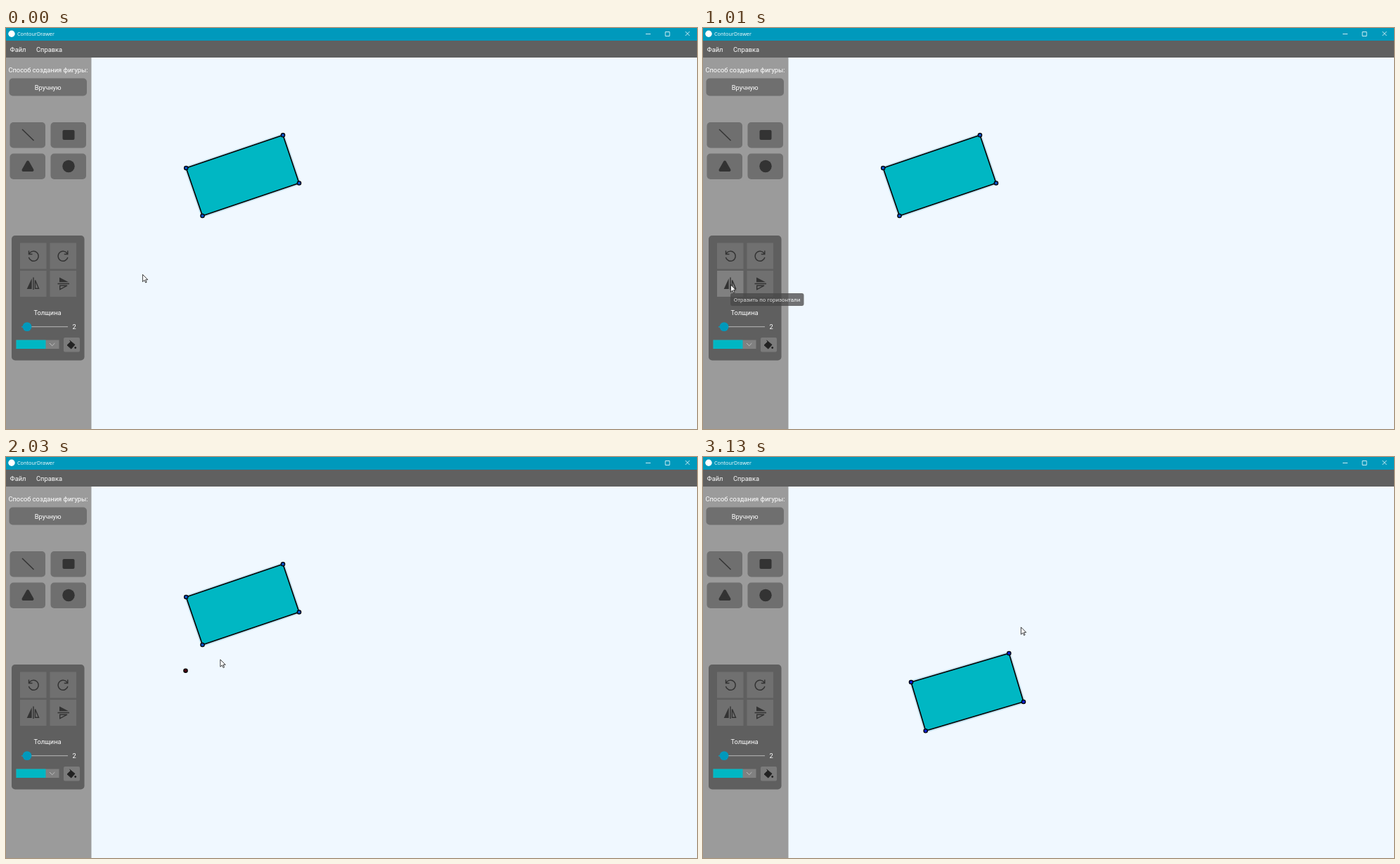
Animation, 983 px wide and 570 px high, one loop 3.26 s. Source, as an HTML page:

```html
<!DOCTYPE html>
<html lang="ru">
<head>
<meta charset="utf-8">
<title>ContourDrawer</title>
<style>
  html, body { margin: 0; width: 100%; height: 100%; overflow: hidden; }
  svg { display: block; }
  text { font: 9.3px Roboto, sans-serif; fill: #fff; }
  .title { font: 7.3px "Open Sans", sans-serif; }
  .mid { text-anchor: middle; }
  .btn { fill: #6f6f6f; }
  .tool rect { fill: #707070; }
  .tool.hover rect { fill: #808080; }
  .ink { fill: #333; }
  .pen { fill: none; stroke: #333; stroke-width: 1.4; }
  .win { fill: none; stroke: #fff; stroke-width: .8; }
  .halo { fill: none; stroke: #8fc4dc; stroke-width: 5; opacity: .45; }
  .shape { fill: #00b7c3; stroke: #000; stroke-width: 1.6; }
  .knob { stroke: #000; stroke-width: 1.2; }
</style>
</head>
<body>
<svg width="983" height="570" viewBox="0 0 983 570">
  <rect width="983" height="570" fill="#f0f8ff"/>

  <!-- window frame and menu -->
  <rect width="983" height="18" fill="#0099bc"/>
  <circle cx="8" cy="8.3" r="4.7" fill="#fff"/>
  <text class="title" x="16" y="11">ContourDrawer</text>
  <path class="win" d="M910 8.5h7M938 5.5h6v6h-6zM966.5 5l6 6m0-6l-6 6"/>
  <rect y="18" width="983" height="24" fill="#606060"/>
  <text x="5.5" y="34">Файл</text>
  <text x="43" y="34">Справка</text>

  <!-- figure tools -->
  <rect y="42" width="121.5" height="528" fill="#9b9b9b"/>
  <text class="mid" x="60" y="63">Способ создания фигуры:</text>
  <rect class="btn" x="4.5" y="71.5" width="110.5" height="25" rx="5"/>
  <text class="mid" x="59.7" y="87.5">Вручную</text>
  <g class="btn">
    <rect x="5.5" y="134" width="50.5" height="36.5" rx="5"/>
    <rect x="63.5" y="134" width="50.5" height="36.5" rx="5"/>
    <rect x="5.5" y="178.5" width="50.5" height="36.5" rx="5"/>
    <rect x="63.5" y="178.5" width="50.5" height="36.5" rx="5"/>
  </g>
  <path class="pen" d="M23 144l16.5 16"/>
  <rect class="ink" x="80.5" y="145" width="17" height="14" rx="2"/>
  <path class="ink" d="M31 190.5l6.5 11.5h-13z" stroke="#333" stroke-width="4" stroke-linejoin="round"/>
  <circle class="ink" cx="89" cy="196.5" r="8.7"/>

  <!-- edit panel -->
  <rect x="8" y="295" width="103.5" height="177.5" rx="5" fill="#5f5f5f"/>
  <g class="tool" data-x="20" data-y="305.5">
    <rect x="20" y="305.5" width="37.5" height="37"/>
    <path class="pen" stroke-width="1.7" d="M32.5 316.5v5h5M33 321a7 7 0 1 1-.6 5"/>
  </g>
  <g class="tool" data-x="62.5" data-y="305.5">
    <rect x="62.5" y="305.5" width="37.5" height="37"/>
    <path class="pen" stroke-width="1.7" d="M87.8 316.5v5h-5M87.3 321a7 7 0 1 0 .6 5"/>
  </g>
  <g class="tool" data-x="20" data-y="345">
    <rect x="20" y="345" width="37.5" height="37"/>
    <path class="ink" d="M36.7 356v15h-7z"/>
    <path class="pen" d="M39 354.5v17.5M41.5 358.5v11.8h5z"/>
  </g>
  <g class="tool" data-x="62.5" data-y="345">
    <rect x="62.5" y="345" width="37.5" height="37"/>
    <path class="ink" d="M76 354.5l13 6.7h-13z"/>
    <path class="pen" d="M73.5 363.5h16.5M76.7 366.2h10.3l-10.3 5.3z"/>
  </g>
  <text class="mid" x="59" y="407.5">Толщина</text>
  <rect x="22" y="424" width="66" height="1.2" fill="#a8a8a8"/>
  <rect x="22" y="424" width="8" height="1.2" fill="#0099bc"/>
  <circle cx="30" cy="424.6" r="6.4" fill="#0099bc"/>
  <text class="mid" x="97" y="428">2</text>
  <rect x="14.5" y="443.5" width="61" height="12.5" fill="#808080"/>
  <rect x="14.5" y="443.5" width="42" height="12.5" fill="#00b7c3"/>
  <path d="M62 448l3.7 3.7 3.7-3.7" fill="none" stroke="#c4c4c4" stroke-width=".9"/>
  <rect x="82" y="440" width="23" height="20.5" rx="2" fill="#7b7b7b"/>
  <path d="M90.5 444l7.5 6.2-5.3 5.8-5.7-5.2 4.8-4.6" fill="#222" stroke="#222" stroke-linejoin="round"/>
  <circle cx="98.7" cy="454.5" r="1.4" fill="#222"/>

  <!-- drawing -->
  <g id="before"></g>
  <g id="after"></g>
  <path id="axis" d="M255.5 303.7L452 241.5" stroke="#000" stroke-width="1.3"/>
  <circle id="dot" class="knob" cx="255.5" cy="303.7" r="2.7" fill="#480010"/>

  <g id="tip">
    <rect x="39" y="377" width="104.5" height="18" rx="3" fill="#484848"/>
    <text class="mid" x="91" y="388.5" style="font-size:7.9px">Отразить по горизонтали</text>
  </g>
  <circle id="click" r="8" fill="#ffff3c" opacity=".75"/>
  <path id="cursor" transform="translate(194 350)" d="M.4.4v10.3l2.5-2.3 1.7 3.6 1.5-.7-1.6-3.5h3.2z"
        fill="#fff" stroke="#000" stroke-width=".75"/>
</svg>
<script>
const LOOP = 3260;
const $ = id => document.getElementById(id);
const show = (id, on) => $(id).style.display = on ? '' : 'none';
const tools = [...document.querySelectorAll('.tool')];

// Cursor tip: [step, x, y]
const path = [
  [0, 194, 350], [1, 188, 349], [2, 166, 345], [4, 112, 340], [6, 67, 341],
  [8, 47, 355], [10, 39, 364.5], [15, 39, 364.5], [16, 45, 362], [18, 118, 341],
  [20, 222, 313], [21, 250, 306], [22, 256, 304], [23, 256, 304], [24, 255.5, 304],
  [28, 255.5, 304], [29, 264, 301], [31, 345, 274], [33, 432, 248],
  [34, 447, 243], [36, 452, 241.5], [99, 452, 241.5]
];

function tipAt(step) {
  const i = path.findIndex(p => p[0] > step);
  const [s0, x0, y0] = path[i - 1], [s1, x1, y1] = path[i];
  const u = (step - s0) / (s1 - s0);
  return [x0 + (x1 - x0) * u, y0 + (y1 - y0) * u];
}

function addShape(id, points, color) {
  const d = 'M' + points.join('L') + 'Z';
  $(id).innerHTML = `<path class="halo" d="${d}"/><path class="shape" d="${d}"/>` +
    points.map(([x, y]) => `<circle class="knob" cx="${x}" cy="${y}" r="2.7" fill="${color}"/>`).join('');
}
addShape('before', [[256.2, 199], [394, 152.3], [417, 220.5], [279.5, 267]], '#0d4fc0');
addShape('after', [[296, 320], [435.3, 279], [456, 348], [316.7, 389.3]], '#0b1fd0');

function draw(now) {
  const t = now % LOOP;
  const step = Math.floor((t + 7) / 67.7); // the picture advances about 15 times a second
  const [x, y] = tipAt(step);
  $('cursor').setAttribute('transform', `translate(${x} ${y})`);

  const over = tools.map(({ dataset: d }) =>
    x >= +d.x && x < +d.x + 37.5 && y >= +d.y && y < +d.y + 37);
  tools.forEach((tool, i) => tool.classList.toggle('hover', over[i]));
  show('tip', over[2] && step >= 14);
  $('tip').setAttribute('opacity', Math.min(1, (step - 13) * .38));

  const flipped = t >= 2640;
  show('before', !flipped);
  show('after', flipped);
  show('axis', flipped && t < 3130);
  show('dot', t >= 1830 && !flipped);
  show('click', t >= 1830 && t < 1900 || flipped && t < 2710);
  $('click').setAttribute('cx', x);
  $('click').setAttribute('cy', y);
}

const start = performance.now();
function tick() {
  draw(performance.now() - start);
  requestAnimationFrame(tick);
}
tick();
</script>
</body>
</html>
```
